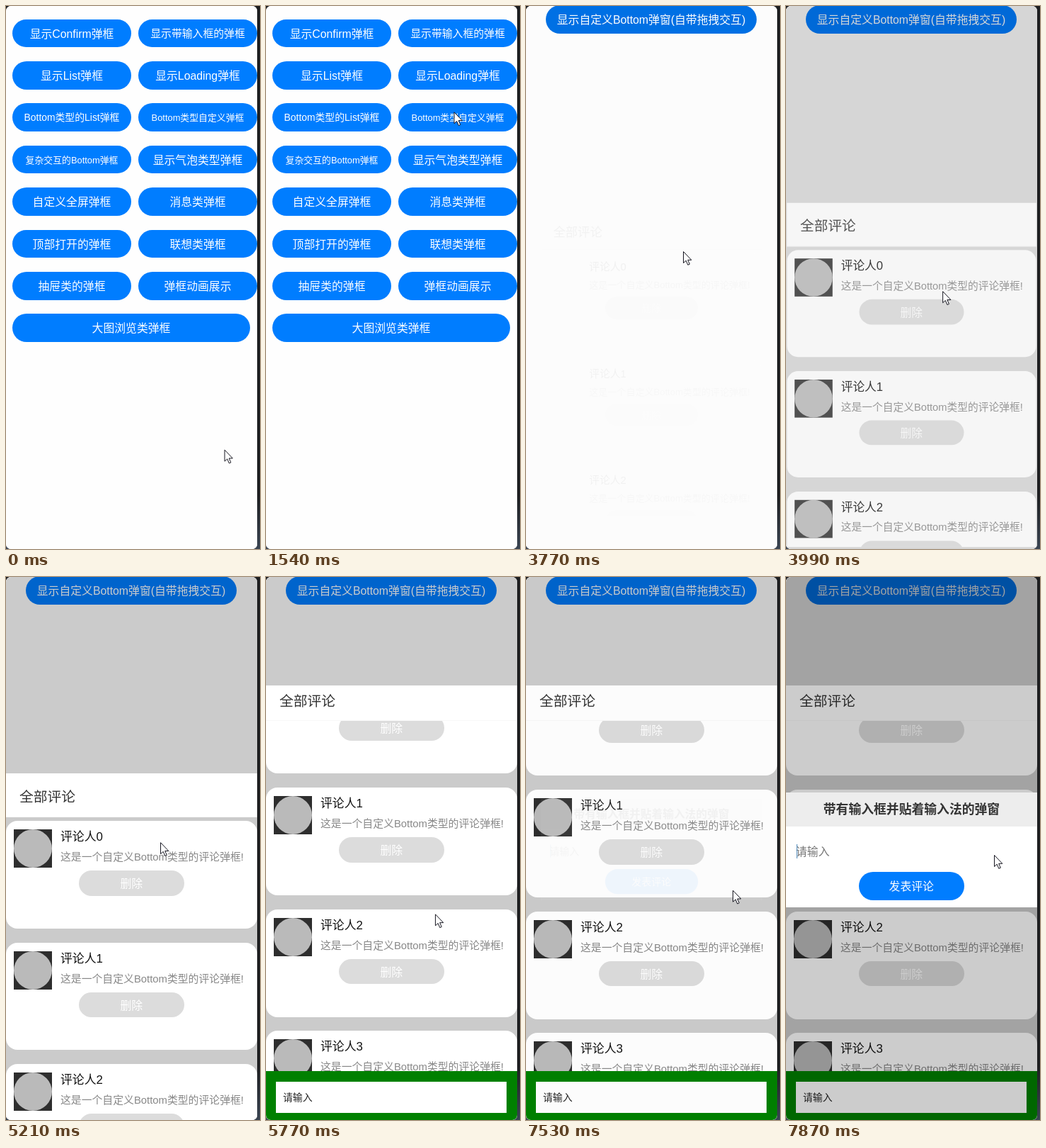
Animation of 359x766 px, one loop 7.99 s. Source, as an HTML page:

```html
<!DOCTYPE html>
<html lang="zh">
<head>
<meta charset="utf-8">
<style>
html, body { margin: 0; width: 100%; height: 100%; overflow: hidden; }
body { position: relative; background: linear-gradient(#1d1e20 90%, #3a4452);
  font-family: "Liberation Sans", "Noto Sans CJK SC", "Noto Sans CJK", sans-serif; }
div { position: absolute; white-space: nowrap; box-sizing: border-box; }
#screen { left: 0; top: 0; width: 355px; height: 766px; overflow: hidden; border-radius: 7px; background: #fefefe; }
.btn { background: #007dff; color: #fff; border-radius: 20px; text-align: center; padding-top: 1px; }
.pressed { background: #0071e6; }
.off { background: #dcdcdc; }
.page { background: #fefefe; }
.mask { background: #000; }
.card { background: #fff; border-radius: 16px; }
svg { position: absolute; left: 0; top: 0; overflow: visible; }
</style>
</head>
<body>
<div id="screen"></div>
<svg id="cursor" width="13" height="21">
  <path d="M.5 .5V16.5L4.2 13.2L6.8 19.3L9.3 18.2L6.7 12.3H11.8Z" fill="#fff" stroke="#15151f" stroke-linejoin="round"/>
</svg>
<script>
const LOOP = 7990, WIDTH = 355, HEIGHT = 766;
const screen = document.getElementById('screen');
const cursor = document.getElementById('cursor');

function box(parent, x, y, w, h, text = '', size = 16, cls = '', css = '') {
  const el = document.createElement('div');
  el.className = cls;
  // Layout units are slightly smaller than a pixel, so font sizes shrink with them.
  el.style.cssText = `left:${x}px;top:${y}px;width:${w}px;height:${h}px;line-height:${h}px;font-size:${size * .99}px;${css}`;
  el.textContent = text;
  parent.append(el);
  return el;
}
const layer = (cls = '') => box(screen, 0, 0, WIDTH, HEIGHT, '', 16, cls);
const fill = (parent, x, y, w, h, color, css = '') => box(parent, x, y, w, h, '', 16, '', `background:${color};${css}`);

// Menu page
const menu = layer('page');
const menuButtons = [
  ['显示Confirm弹框'], ['显示带输入框的弹框', 15],
  ['显示List弹框'], ['显示Loading弹框'],
  ['Bottom类型的List弹框', 14], ['Bottom类型自定义弹框', 13],
  ['复杂交互的Bottom弹框', 13], ['显示气泡类型弹框'],
  ['自定义全屏弹框'], ['消息类弹框'],
  ['顶部打开的弹框'], ['联想类弹框'],
  ['抽屉类的弹框'], ['弹框动画展示'],
  ['大图浏览类弹框']
].map(([text, size], i, all) =>
  box(menu, i % 2 ? 187 : 9, 18.6 + 59.4 * (i >> 1), i === all.length - 1 ? 336 : 168, 39.6, text, size, 'btn'));

// Second page
const page = layer('page');
const openButton = box(page, 28, -.9, 298, 39.6, '显示自定义Bottom弹窗(自带拖拽交互)', 16, 'btn');

// Comment panel
const panelMask = layer('mask');
const panel = layer();
const list = box(panel, 0, 0, WIDTH, 0, '', 16, '', 'overflow:hidden');
const rows = box(list, 0, 0, WIDTH, 0);
const avatars = [0, 1, 2, 3, 4].map(i => {
  const card = box(rows, 0, 171.7 * i, WIDTH, 151.8, '', 16, 'card');
  box(card, 77, 13, 200, 20, '评论人' + i, 17, '', 'color:#111');
  box(card, 77, 41, 270, 20, '这是一个自定义Bottom类型的评论弹框!', 15, '', 'color:#888');
  box(card, 103, 70, 148.5, 35.5, '删除', 16, 'btn off');
  const avatar = fill(card, 11, 12, 54, 54, '#2e2e2e');
  fill(avatar, 0, 0, 54, 54, '#bababa', 'border-radius:50%');
  return avatar;
});
const header = fill(panel, 0, 0, WIDTH, 0, '#fff', 'border-bottom:1px solid #f8f8f8');
const title = box(header, 19, 0, 200, 26, '全部评论', 20, '', 'color:#333');
const bar = fill(panel, 0, 0, WIDTH, 69, '#008000');
box(bar, 14, 15, 326, 44, '请输入', 14, '', 'background:#fff;color:#222;padding-left:10px');

// Input dialog
const inputMask = layer('mask');
const dialog = layer();
fill(dialog, 0, 304, WIDTH, 162, '#fff');
box(dialog, 0, 304, WIDTH, 48, '带有输入框并贴着输入法的弹窗', 18, '', 'background:#ededed;color:#333;font-weight:bold;text-align:center');
box(dialog, 14, 377, 200, 22, '请输入', 16, '', 'color:#777');
fill(dialog, 15, 377, 1, 20, '#4a86b8');
box(dialog, 103, 416, 148.5, 39.6, '发表评论', 16, 'btn');

// Pointer stops: arrival time, x, y. Each move takes at most MOVE ms, then rests.
const MOVE = 560;
const stops = [
  [0, 309, 630], [100, 286, 415], [430, 346, 450], [1100, 126, 153], [1540, 266, 149],
  [1980, 150, 212], [2340, 132, 432], [3100, 215, 24], [3770, 222, 346], [4430, 218, 606],
  [5210, 218, 374], [5770, 239, 475], [6210, 225, 551], [6990, 142, 735], [7530, 292, 442],
  [7870, 294, 392]
];

const progress = (t, from, to) => Math.min(1, Math.max(0, (t - from) / (to - from)));
const easeOut = p => 1 - (1 - p) ** 2;
const mix = (a, b, p) => a + (b - a) * p;
const during = (t, from, to) => t >= from && t < to;

function movePointer(t) {
  const next = stops.findIndex(s => s[0] > t);
  const to = stops.at(next), from = next < 1 ? to : stops[next - 1];
  const p = progress(t, Math.max(from[0] - 1, to[0] - MOVE), to[0]);
  cursor.style.transform = `translate(${mix(from[1], to[1], p)}px, ${mix(from[2], to[2], p)}px)`;
}

// Dialogs fade in and grow about the centre of the screen.
function reveal(el, mask, t, start) {
  const p = progress(t, start, start + 300);
  el.style.opacity = p ** 1.5;
  el.style.transform = p < 1 ? `scale(${mix(.85, 1, 1 - (1 - p) ** 1.6)})` : 'none';
  mask.style.opacity = .2 * p ** 1.5;
}

function slidePages(t) {
  const p = easeOut(progress(t, 1950, 2300));
  menu.style.transform = `translateX(${-30 * p}%)`;
  page.style.transform = `translateX(${100 - 100 * p}%)`;
}

function raisePanel(t) {
  const p = easeOut(progress(t, 5380, 5760));
  const top = mix(277, 153, p), height = mix(62, 50, p), bottom = top + height;
  const firstCard = mix(344, 125.3, p) + 3 * progress(t, 5780, 6000);
  header.style.top = top + 'px';
  header.style.height = height + 'px';
  title.style.top = mix(20, 9, p) + 'px';
  list.style.top = bottom + 'px';
  list.style.height = HEIGHT - bottom + 'px';
  rows.style.top = firstCard - bottom + 'px';
  bar.style.top = mix(821, 697, p) + 'px';
}

function render(t) {
  slidePages(t);
  menuButtons[6].classList.toggle('pressed', during(t, 1850, 2100));
  openButton.classList.toggle('pressed', during(t, 3320, 3850));
  reveal(panel, panelMask, t, 3735);
  avatars.forEach(a => a.style.visibility = t > 3800 ? 'inherit' : 'hidden');
  raisePanel(t);
  reveal(dialog, inputMask, t, 7490);
  movePointer(t);
}

function tick() {
  render(performance.now() % LOOP);
  requestAnimationFrame(tick);
}
tick();
</script>
</body>
</html>
```
